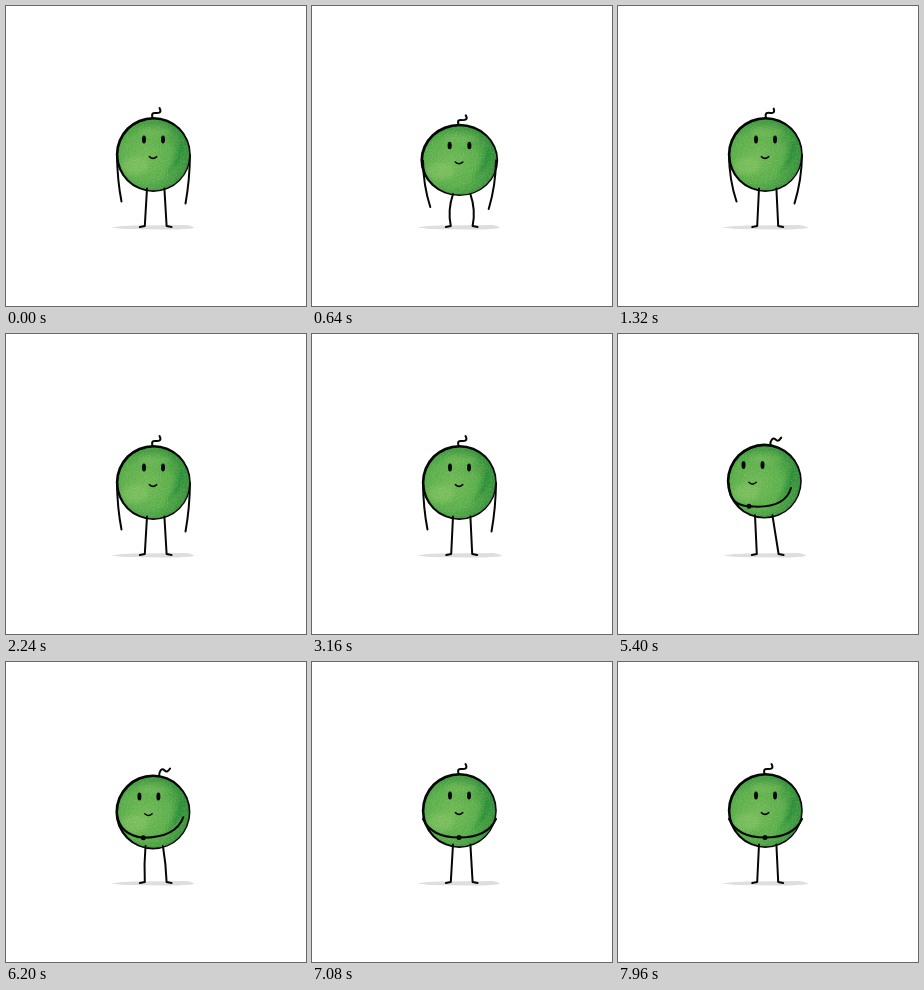
An HTML page for the animation above (8000 ms loop, 300 by 300 pixels).

```html
<!DOCTYPE html>
<html lang="en">
<head>
<meta charset="utf-8">
<title>Green fellow</title>
<style>
html, body { margin: 0; width: 100%; height: 100%; overflow: hidden; background: #fff; }
svg { display: block; width: 100vw; height: 100vh; }
.ink { fill: none; stroke: #050705; stroke-width: 2; stroke-linecap: round; stroke-linejoin: round; }
.solid { fill: #050705; }
</style>
</head>
<body>
<svg viewBox="0 0 300 300">
  <defs>
    <radialGradient id="skin" gradientUnits="userSpaceOnUse" cx="140" cy="151" r="45">
      <stop offset="0" stop-color="#6fb955"/>
      <stop offset=".55" stop-color="#5aae4b"/>
      <stop offset="1" stop-color="#2f8a38"/>
    </radialGradient>
    <clipPath id="round"><circle cx="147.6" cy="148.7" r="36"/></clipPath>
    <filter id="soft" x="-50%" y="-50%" width="200%" height="200%"><feGaussianBlur stdDeviation="2.2"/></filter>
    <filter id="grain" x="0" y="0" width="100%" height="100%">
      <feTurbulence type="fractalNoise" baseFrequency=".7" numOctaves="2" seed="4"/>
      <feColorMatrix values="0 0 0 0 .72  0 0 0 0 .85  0 0 0 0 .5  1.2 0 0 0 -.5"/>
    </filter>
  </defs>
  <path id="shadow" fill="#dedede"/>
  <g id="body">
    <circle cx="147.6" cy="148.7" r="36" fill="url(#skin)"/>
    <g clip-path="url(#round)">
      <g filter="url(#soft)">
        <ellipse cx="129" cy="160" rx="13" ry="9" fill="#8cc765" opacity=".5"/>
        <ellipse cx="149" cy="126" rx="16" ry="5" fill="#7dc05d" opacity=".4"/>
        <path d="M179 134Q180 157 160 168Q172 153 173 137Z" fill="#1f8a35" opacity=".8"/>
      </g>
      <rect x="110" y="111" width="76" height="76" filter="url(#grain)" opacity=".4"/>
    </g>
    <!-- Off-centre rings make the outline heavier at the top left. -->
    <path class="solid" fill-rule="evenodd" d="M109.8 148.4a37.5 37.5 0 1 0 75 0a37.5 37.5 0 1 0-75 0ZM112.4 148.9a35.4 35.4 0 1 0 70.8 0a35.4 35.4 0 1 0-70.8 0Z"/>
    <path id="sprig" class="ink"/>
    <g id="face">
      <ellipse class="solid" cx="138" cy="133.4" rx="2" ry="4"/>
      <ellipse class="solid" cx="157" cy="133.4" rx="2" ry="4"/>
      <path class="ink" style="stroke-width:1.5" d="M143.4 150.6Q147 154.2 150.7 150.6"/>
    </g>
  </g>
  <g class="ink"><path id="legL"/><path id="legR"/><path id="armL"/><path id="armR"/></g>
  <circle id="hands" class="solid" r="2.5"/>
</svg>
<script>
const LOOP = 8000, STEP = 40, MID = 147.5, CENTER_Y = 148.5;
const el = id => document.getElementById(id);
const set = (id, name, value) => el(id).setAttribute(name, value);

const lerp = (a, b, k) => a + (b - a) * k;
const ease = (t, from, to) => {
  const u = Math.min(1, Math.max(0, (t - from) / (to - from)));
  return u * u * (3 - 2 * u);
};
const bump = (t, peak, reach) => 1 - ease(Math.abs(t - peak), 0, reach);
const turnAt = t => ease(t, 4980, 5280) - ease(t, 6050, 6400);

const sprigUp = [146.5, 112, 145, 106, 148, 107, 150.5, 107, 156, 106.5, 153.5, 102];
const sprigSide = [153.5, 112, 153.5, 108, 156, 104, 158.5, 106.5, 162, 108.5, 164.5, 105];

function drawSprig(lean) {
  const [x, y, ...rest] = sprigUp.map((v, i) => lerp(v, sprigSide[i], lean));
  set("sprig", "d", `M${x} ${y}C${rest.slice(0, 6).join(" ")}S${rest.slice(6).join(" ")}`);
}

function drawArm(id, side, y, { flare, inward, clasp, turn }) {
  const away = side > 0 ? turn : 0, near = turn - away;
  const loose = y * (1 - clasp);
  const shoulderX = MID + side * 36.5 - 11 * away;
  const shoulderY = lerp(149, 157, clasp) - 7 * near - 3 * away + loose;
  const bendX = MID + side * lerp(36.2 + 13 * flare, 28, clasp) - 9 * turn;
  const bendY = lerp(174 - 14 * flare, 175.5, clasp) - 4 * near + loose;
  const handX = lerp(MID + side * (32 + 24 * flare - 3 * inward), 147 - 16 * turn, clasp);
  const handY = lerp(196.5 + side - 15 * flare, 175.5 - 2 * turn + y, clasp) + loose;
  set(id, "d", `M${shoulderX} ${shoulderY}Q${bendX} ${bendY} ${handX} ${handY}`);
  set("hands", "cx", handX);
  set("hands", "cy", handY);
}

function drawLeg(id, side, y, shift, lift, wobble) {
  const hipX = 149.7 + side * 8.7 + shift, hipY = 182.5 + y;
  const ankleX = 149.7 + side * (10.9 - wobble), ankleY = 220 - lift;
  const bend = side * Math.max(0, y) * .8;
  set(id, "d", `M${hipX} ${hipY}Q${(hipX + ankleX) / 2 + bend} ${(hipY + ankleY) / 2} ${ankleX} ${ankleY}l${side * 5} 1`);
}

function draw(t) {
  const wide = t % 200 >= 100 ? 1 : 0;
  const flare = bump(t, 920, 220);
  const crouch = bump(t, 600, 240), landing = bump(t, 1150, 120);
  const inward = crouch + bump(t, 1320, 300);
  const clasp = ease(t, 4480, 4800);
  const turn = turnAt(t), face = turn * turn;

  const y = 6 * crouch + 4 * landing - 17 * bump(t, 880, 200)
    + 1.5 * bump(t, 4480, 180) + 2 * bump(t, 6200, 140)
    - 1.3 * face - bump(t, 6400, 120) - bump(t, 7820, 120);
  const stretch = 1 - .04 * crouch - .03 * landing + .03 * bump(t, 740, 100);

  set("shadow", "d", `M${105 - wide} 221.5Q116 219.3 131 219.5L181 219Q${188 + 2 * wide} 220.5 ${188 + 2 * wide} 222Q178 223.8 160 223.4L118 223Z`);
  set("body", "transform",
    `translate(${MID - face} ${CENTER_Y + y}) scale(${2 - stretch} ${stretch}) translate(${-MID} ${-CENTER_Y})`);
  set("face", "transform", `translate(${-11.5 * face} ${-face})`);

  // The sprig trails behind the turning body.
  drawSprig(turnAt(t - 150) + .2 * bump(t, 1320, 300));
  const lift = 13 * bump(t, 890, 180);
  const arm = { flare, inward, clasp, turn };
  for (const [name, side] of [["L", -1], ["R", 1]]) {
    drawLeg("leg" + name, side, y, -4 * face, lift, .4 * wide);
    drawArm("arm" + name, side, y, arm);
  }
  set("hands", "opacity", clasp > .95 ? 1 : 0);
}

const start = performance.now();
function tick() {
  const t = (performance.now() - start) % LOOP;
  draw(Math.floor(t / STEP) * STEP);
  requestAnimationFrame(tick);
}
tick();
</script>
</body>
</html>
```
